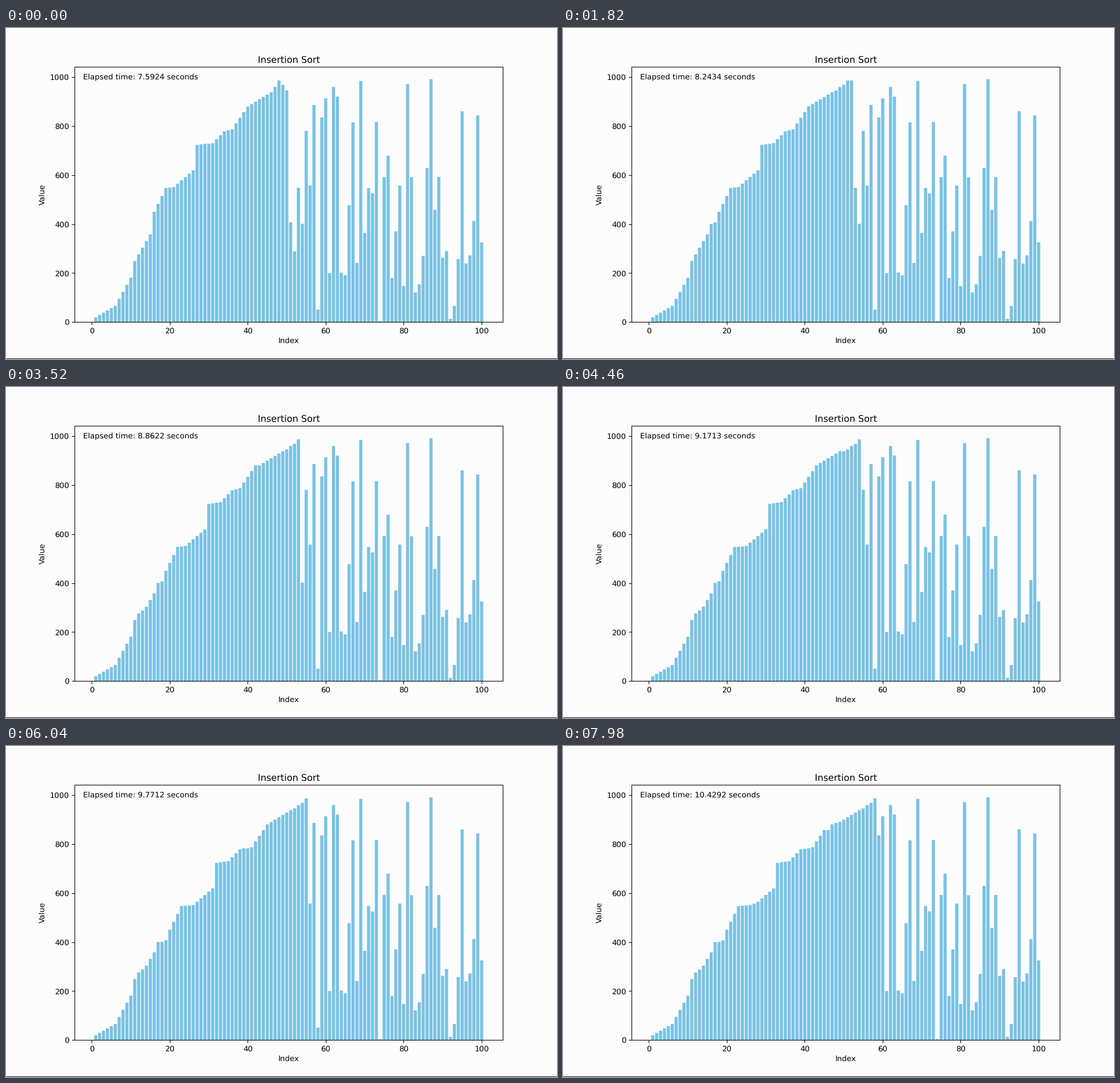
A matplotlib script for the animation above (8000 ms loop, 965 by 580 pixels).

```python
import math

import matplotlib.pyplot as plt
import numpy as np
from matplotlib.animation import FuncAnimation
from matplotlib.collections import PolyCollection
from matplotlib.patches import Rectangle

W, H = 965, 580
LEFT, TOP, RIGHT, BOTTOM = 120.4, 68.4, 869.8, 515.3
TICK_MS, LOOP_MS = 20, 8000
PAPER, SKY, EDGE = "#fcfcfd", "#79c2e4", "#1c1c1e"
SCALE = 0.967

# Corners (rank, value) of the rising curve that is already in order.
CURVE = [(1, 20), (6, 66), (10, 181), (11, 249), (15, 358), (16, 450),
         (19, 547), (21, 551), (26, 619), (27, 723), (30, 730), (33, 778),
         (35, 787), (39, 880), (45, 938), (46, 959), (47, 986)]
# Chart data: the values still waiting for their turn.
WAITING = [400, 968, 945, 407, 288, 548, 401, 780, 557, 886, 51, 835, 913, 200,
           959, 920, 202, 191, 477, 815, 241, 984, 364, 547, 525, 816, 4, 592,
           679, 180, 370, 557, 147, 971, 591, 121, 154, 270, 629, 991, 458,
           592, 262, 290, 13, 66, 257, 860, 239, 272, 412, 843, 325]
FIRST_SHIFT = 18
SHIFTS_PER_SECOND = 78.9

# Clock reading (picture, seconds); the pace wavers a little.
CLOCK = [(0, 7.5924), (39, 8.2434), (58, 8.5694), (95, 9.1713),
         (130, 9.7712), (154, 10.1502), (171, 10.4292)]


def along(points, x):
    return np.interp(x, *zip(*points))


def insertion_states(values, start):
    """Yield the list after each shift to the right."""
    values = list(values)
    for i in range(start, len(values)):
        key, j = values[i], i - 1
        while j >= 0 and values[j] > key:
            values[j + 1] = values[j]
            j -= 1
            yield list(values)
        values[j + 1] = key


def bar_verts(heights, width=0.8):
    left = np.arange(1, len(heights) + 1) - width / 2
    right, base = left + width, np.zeros(len(heights))
    corners = [(left, base), (left, heights), (right, heights), (right, base)]
    return np.stack([np.column_stack(c) for c in corners], axis=1)


ordered = along(CURVE, np.arange(1, CURVE[-1][0] + 1))
states = list(insertion_states([*ordered, *WAITING], len(ordered)))[FIRST_SHIFT:]

plt.rcParams.update({
    "font.family": "DejaVu Sans",
    "font.size": 10 * SCALE,
    "text.hinting": "none",
    "axes.titlesize": 12 * SCALE,
    "axes.titlepad": 6 * SCALE,
    "axes.labelpad": 4 * SCALE,
    "axes.linewidth": 0.8 * SCALE,
})
for axis in ("xtick", "ytick"):
    plt.rcParams.update({f"{axis}.major.size": 3.5 * SCALE,
                         f"{axis}.major.width": 0.8 * SCALE,
                         f"{axis}.major.pad": 3.5 * SCALE})

fig = plt.figure(figsize=(W / 100, H / 100), dpi=100, facecolor=PAPER)
ax = fig.add_axes([LEFT / W, 1 - BOTTOM / H, (RIGHT - LEFT) / W,
                   (BOTTOM - TOP) / H], facecolor=PAPER)
ax.set(title="Insertion Sort", xlabel="Index", ylabel="Value",
       xlim=(-4.39, 105.39), ylim=(0, max(WAITING) * 1.05),
       xticks=range(0, 101, 20), yticks=range(0, 1001, 200))
bars = PolyCollection(bar_verts(states[0]), facecolors=SKY, linewidths=0,
                      snap=False)
ax.add_collection(bars, autolim=False)
label = ax.text(0.02, 0.95, "", transform=ax.transAxes)
fig.add_artist(Rectangle((0, 0), 1, 1 / H, transform=fig.transFigure,
                         facecolor=EDGE, linewidth=0))


def update(frame):
    # Pictures last 20, 100 and 20 ms in turn.
    cycle, phase = divmod(frame * TICK_MS, 140)
    picture = 3 * cycle + (phase >= 20) + (phase >= 120)
    seconds = along(CLOCK, picture)
    step = math.ceil((seconds - CLOCK[0][1]) * SHIFTS_PER_SECOND)
    bars.set_verts(bar_verts(states[step]))
    label.set_text(f"Elapsed time: {seconds:.4f} seconds")
    return bars, label


anim = FuncAnimation(fig, update, frames=LOOP_MS // TICK_MS, interval=TICK_MS,
                     init_func=lambda: update(0), repeat=True, repeat_delay=0)
plt.show()
```
